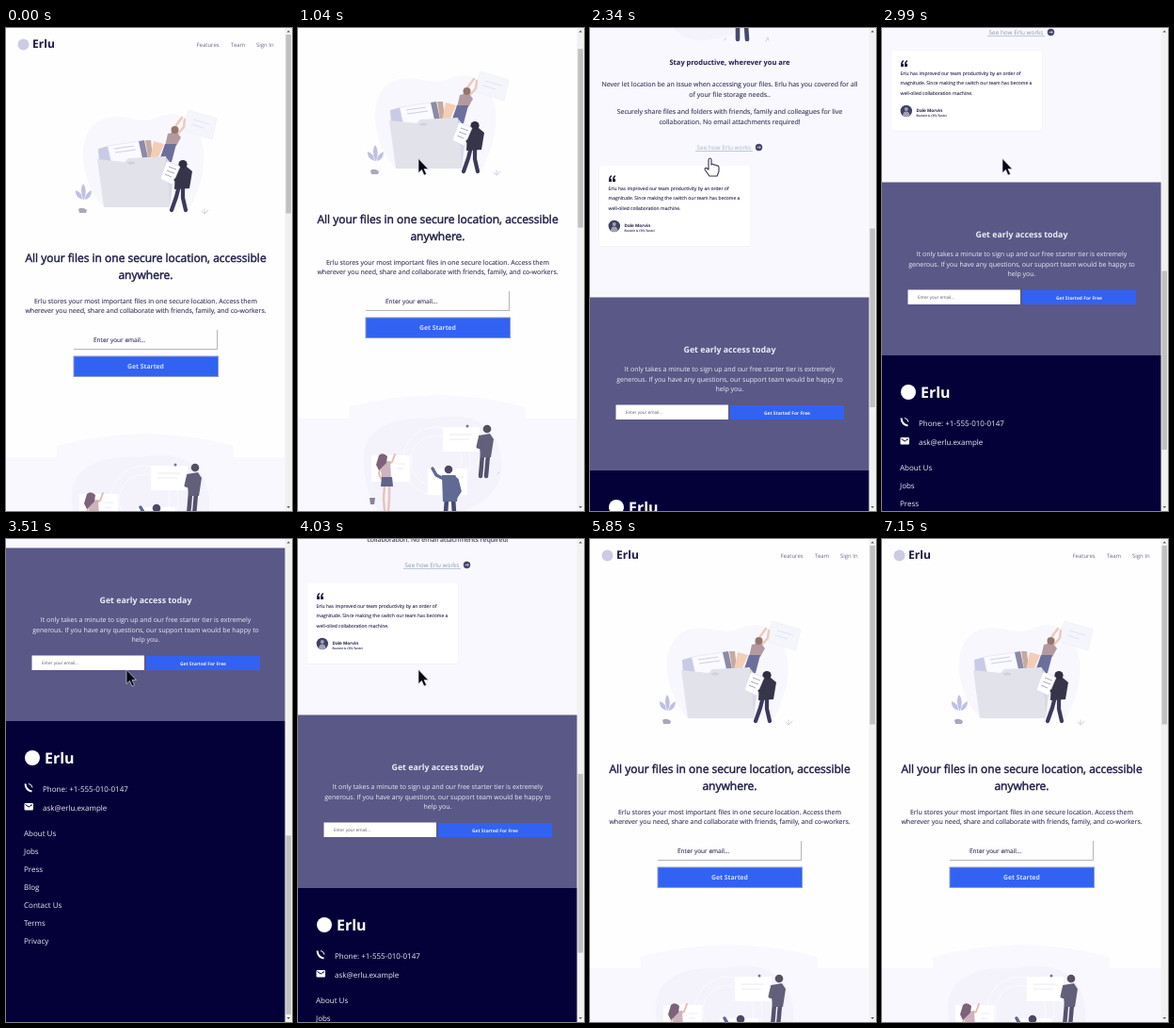
Recreate the animation shown at these times as an HTML page. Size 304 px wide and 512 px high, loop 7.28 s.

```html
<!DOCTYPE html>
<html lang="en">
<head>
<meta charset="utf-8">
<title>Landing page scroll</title>
<style>
  html, body { margin: 0; width: 100%; height: 100%; overflow: hidden; background: #fefefe; }
  svg { display: block; width: 100vw; height: 100vh; }
  text { font: 7px "Open Sans", sans-serif; fill: #37365a; stroke: #37365a; stroke-width: .12; text-rendering: geometricPrecision; white-space: pre; }
  .mid { text-anchor: middle; }
  .bold { font-weight: 700; stroke: none; }
  .ink { fill: #1f1d47; }
  .hero { font-size: 12px; fill: #1f1d47; stroke: #1f1d47; stroke-width: .45; }
  .nav { font-size: 6px; fill: #6c6a88; stroke: none; }
  .quote { font-size: 5px; fill: #29284a; }
  .light text, .foot text { fill: #ededf6; stroke: none; }
  .foot text { font-size: 8px; }
  .limb { fill: none; stroke-linecap: round; stroke-linejoin: round; }
  #link text { font-size: 6.4px; fill: #8b98aa; stroke: none; }
  #link path { stroke: #a3b5c4; stroke-width: .7; }
  #link.hover text { fill: #a6b5cc; }
</style>
</head>
<body>
<svg viewBox="0 0 304 512">
  <g id="page">
    <rect width="297" height="1345" fill="#fefefe"/>

    <!-- header -->
    <circle cx="18.5" cy="17.5" r="6" fill="#cccbe4"/>
    <text x="28" y="21.3" class="bold ink" style="font-size:12.1px">Erlu</text>
    <text x="202.5" y="19.8" class="nav">Features</text>
    <text x="239" y="19.8" class="nav">Team</text>
    <text x="266" y="19.8" class="nav">Sign In</text>

    <!-- hero picture -->
    <path fill="#f7f7fd" d="M84 151C78 128 84 100 108 95C130 91 142 103 160 95C186 83 205 101 209 124C214 147 205 172 196 190H104C96 181 87 167 84 151Z"/>
    <path fill="#f5f5fc" stroke="#ededf7" stroke-width=".6" d="M194 87L224 96L219 118L186 108Z"/>
    <path stroke="#e4e4f2" d="M199 97L216 102M197 102L210 106"/>
    <path fill="#c9cbe6" d="M98 128L109 125L112 143H99Z"/>
    <path fill="#fafaff" stroke="#e0e0ee" stroke-width=".6" d="M108 125L141 120L148 143H112Z"/>
    <path stroke="#cfcfe6" d="M115 128L136 125M116 132L138 129"/>
    <path fill="#8d8aa5" d="M141 120L147 119L151 138H145Z"/>
    <path fill="#c5aaa3" d="M148 119L154 119L156 137H151Z"/>
    <path fill="#f3cdb6" d="M157 120L168 123L161 139H153Z"/>
    <path class="limb" stroke="#eccab9" stroke-width="2.4" d="M176 112L181 103L187 95M182 113L189 105L190 97"/>
    <path fill="#b39aa0" d="M172 112L181 110L186 116L181 125H169Z"/>
    <circle cx="179.500" cy="108" r="4" fill="#94766f"/>
    <path fill="#6c6f9c" d="M169 123H181L176 142L162 143Z"/>
    <path fill="#e2e2eb" d="M97 139L126 142L130 138L170 136L174 190H104Z"/>
    <path fill="#d9d9e5" d="M170 137L179 148L174 190Z"/>
    <ellipse cx="133" cy="143" rx="4" ry="1.500" fill="#d0d0df"/>
    <path class="limb" stroke="#3b3a5a" stroke-width="4.200" d="M184 167L181 179L176 193M188 167L188 180L191 193"/>
    <path fill="#37354a" d="M180 149L192 147L198 152L195 170L179 171Z"/>
    <circle cx="188" cy="144.500" r="4.600" fill="#312e40"/>
    <path fill="#fff" stroke="#d8d8e6" stroke-width=".6" d="M171 141L185 147L177 166L164 160Z"/>
    <path stroke="#a9a8bd" d="M173 147L181 150M171 151L179 154M169 155L176 158"/>
    <path class="limb" stroke="#37354a" stroke-width="3" d="M194 156L187 163L180 161"/>
    <path fill="#bfc0e2" d="M82 182Q78 170 82 165Q87 171 83 182ZM81 182Q73 179 74 172Q81 174 81 182ZM84 182Q84 175 91 172Q91 180 84 182Z"/>
    <path class="limb" stroke="#cfcfe6" d="M211 197V192M208 194L211 197L215 193"/>
    <path fill="#a9a8bd" d="M77 192Q81 189 86 193L85 196H78Z"/>

    <!-- hero copy -->
    <text x="148.500" y="248.300" class="mid hero">All your files in one secure location, accessible</text>
    <text x="148.500" y="266.300" class="mid hero">anywhere.</text>
    <text x="148.500" y="291.700" class="mid">Erlu stores your most important files in one secure location. Access them</text>
    <text x="148.500" y="301.700" class="mid">wherever you need, share and collaborate with friends, family, and co-workers.</text>
    <path fill="none" stroke="#b4b4bd" d="M72 340.500H224.500V320"/>
    <text x="93" y="333.200" style="font-size:6.5px">Enter your email...</text>
    <rect x="72" y="348" width="153.500" height="21.500" fill="#3262f2" stroke="#8a9ad2"/>
    <text x="148.500" y="361.200" class="mid bold" style="font-size:6.8px;fill:#d3dcfd">Get Started</text>

    <!-- productivity section -->
    <path fill="#f8f8fe" d="M0 455H54V443Q98 431 148 430Q198 431 242 443V455H297V843H0Z"/>
    <path fill="#f4f3fc" d="M70 494C72 462 108 452 143 455C177 447 208 458 214 488C221 512 212 536 190 546C168 558 122 580 98 565C78 552 69 522 70 494Z"/>
    <g fill="none" stroke="#fbfbff">
      <circle cx="147" cy="500" r="36"/><circle cx="147" cy="500" r="27"/>
    </g>
    <g fill="#fff">
      <rect x="154" y="464" width="39" height="26"/>
      <rect x="78" y="494" width="41" height="28"/>
      <rect x="138" y="508" width="42" height="28"/>
    </g>
    <path stroke="#e8e8f5" d="M161 472H185M161 477H182M105 503H114M105 508H112M169 517H176"/>
    <circle cx="180" cy="463" r="1.500" fill="#777695"/>

    <path class="limb" stroke="#e8c5be" stroke-width="2.600" d="M92 526L91 540L92 552M97 526L97 540L96 552"/>
    <path class="limb" stroke="#e6bdb5" stroke-width="2" d="M96 503L100 501L103 493M88 504L86 514L90 521"/>
    <path fill="#cdb4be" d="M87 501L98 500L99 518H89Z"/>
    <path fill="#626389" d="M89 517H100L101 527H88Z"/>
    <path fill="#7c6379" d="M86 494Q90 490 95 495L94 502L86 510L83 504Z"/>
    <path fill="#85849c" d="M76 539H82L81 546H77Z"/>

    <path class="limb" stroke="#474a70" stroke-width="4.600" d="M158 540L157 555L157 569M165 540L166 555L167 569"/>
    <path fill="#606a94" d="M153 515L167 515L171 521L169 543H154Z"/>
    <path class="limb" stroke="#606a94" stroke-width="3.500" d="M155 519L147 515L143 508M169 520L172 532L168 538"/>
    <circle cx="160" cy="509" r="4.300" fill="#4c4863"/>

    <path class="limb" stroke="#55526d" stroke-width="4.500" d="M196 493L195 505L194 516M202 493L201 505L200 516"/>
    <path fill="#625f7a" d="M192 473L204 471L208 477L205 496H194Z"/>
    <path class="limb" stroke="#625f7a" stroke-width="3" d="M193 476L191 485L198 487"/>
    <circle cx="201" cy="466" r="4.300" fill="#57505f"/>
    <path class="limb" stroke="#cfcee0" d="M187 571L189 567L190 570M142 570L145 568M212 514L214 512"/>

    <text x="148.500" y="595.700" class="mid bold ink" style="font-size:7.5px">Stay productive, wherever you are</text>
    <text x="148.500" y="618.600" class="mid">Never let location be an issue when accessing your files. Erlu has you covered for all</text>
    <text x="148.500" y="629.600" class="mid">of your file storage needs..</text>
    <text x="148.500" y="648" class="mid">Securely share files and folders with friends, family and colleagues for live</text>
    <text x="148.500" y="658.700" class="mid">collaboration. No email attachments required!</text>
    <g id="link">
      <text x="142.500" y="685.800" class="mid">See how Erlu works</text>
      <path d="M112 687.500H173"/>
      <circle cx="179.500" cy="683.500" r="3.700" fill="#45456c"/>
      <path style="stroke:#d6dbea" fill="none" d="M177.500 683.500H181M179.800 682L181.300 683.500L179.800 685"/>
    </g>

    <!-- testimonial -->
    <rect x="9.500" y="703" width="161" height="86" rx="2" fill="#f1f1f8"/>
    <rect x="10" y="703" width="160" height="85" rx="2" fill="#fff"/>
    <path fill="#1e1b42" d="M23 713Q20 714 20 718V720H23V717H21.700Q22 715 23 714.500ZM27 713Q24 714 24 718V720H27V717H25.700Q26 715 27 714.500Z"/>
    <text x="19.500" y="728.700" class="quote">Erlu has improved our team productivity by an order of</text>
    <text x="19.500" y="739.400" class="quote">magnitude. Since making the switch our team has become a</text>
    <text x="19.500" y="750" class="quote">well-oiled collaboration machine.</text>
    <circle cx="25.800" cy="767" r="6.200" fill="#3f4262"/>
    <path fill="#a2a0b5" d="M22 771.800Q22.500 767.500 25.800 767.500T29.600 771.800Q25.800 774.500 22 771.800Z"/>
    <circle cx="25.800" cy="765" r="2" fill="#a2a0b5"/>
    <text x="36.500" y="767.700" class="bold ink" style="font-size:4.6px">Dale Morvin</text>
    <text x="36.500" y="772.700" style="font-size:3px">Founder &amp; CEO, Tandel</text>

    <!-- sign-up -->
    <g class="light">
      <rect y="842.500" width="297" height="184" fill="#5a5887"/>
      <text x="148.500" y="901.400" class="mid bold" style="font-size:8.8px">Get early access today</text>
      <text x="148.500" y="921" class="mid">It only takes a minute to sign up and our free starter tier is extremely</text>
      <text x="148.500" y="931.500" class="mid">generous. If you have any questions, our support team would be happy to</text>
      <text x="148.500" y="942" class="mid">help you.</text>
      <rect x="27.500" y="956.500" width="119.500" height="15.500" fill="#fff"/>
      <rect x="149" y="957" width="121" height="15" fill="#3262f2"/>
      <text x="38" y="966.300" style="font-size:4.6px;fill:#55556e">Enter your email...</text>
      <text x="209.500" y="966.500" class="mid bold" style="font-size:4.9px">Get Started For Free</text>
    </g>

    <!-- footer -->
    <g class="foot">
      <rect y="1026" width="297" height="319" fill="#040139"/>
      <circle cx="28" cy="1065" r="8" fill="#fff"/>
      <text x="41" y="1070.700" class="bold" style="font-size:16px;fill:#fff">Erlu</text>
      <path fill="none" stroke="#fff" stroke-width="2" d="M20.500 1092.500Q21 1099.500 27.500 1100.500"/>
      <path fill="none" stroke="#fff" d="M24 1092.500Q27.500 1093 28 1096.500"/>
      <rect x="19.500" y="1113" width="9.500" height="7.500" rx="1" fill="#fff"/>
      <path fill="none" stroke="#040139" d="M20.500 1114.500L24.250 1117L28 1114.500"/>
      <text x="39" y="1101.300">Phone: +1-555-010-0147</text>
      <text x="39" y="1121">ask@erlu.example</text>
      <text x="19" y="1148.300">About Us</text>
      <text x="19" y="1167.300">Jobs</text>
      <text x="19" y="1186.300">Press</text>
      <text x="19" y="1205.300">Blog</text>
      <text x="19" y="1224.300">Contact Us</text>
      <text x="19" y="1243.300">Terms</text>
      <text x="19" y="1262.300">Privacy</text>
    </g>
  </g>

  <!-- scrollbar -->
  <rect x="296.500" width="7.500" height="512" fill="#f1f1f1"/>
  <rect id="thumb" x="297.500" y="7" width="5.500" height="189.500" fill="#c1c1c1"/>
  <path fill="#555" d="M298.500 4.500H302L300.250 2.500ZM298.500 507H302L300.250 509Z"/>

  <!-- pointers -->
  <path id="arrow" fill="#080814" stroke="#e8e8f2" stroke-width=".6" d="M128 138.500V153.500L131.500 150.300L134 156L136.500 154.800L134 149.500H138.500Z"/>
  <path id="hand" fill="#fff" stroke="#34344a" stroke-width="1.100" stroke-linejoin="round" d="M126 150V140Q126 138 127.500 138T129 140V145Q130.500 143.500 132 145.300Q133.500 144.300 134.500 146Q137 145.500 137 148V152L135 157H127L122.300 150.500Q121.500 148.500 123.500 148.200Z"/>
</svg>
<script>
  const LOOP = 7280, STEP = 130, SCROLLBAR_RATIO = 0.369;
  // [time, scroll offset]
  const scrollKeys = [
    [0, 0], [780, 0], [1170, 62], [1690, 256], [2340, 557], [2470, 570], [2600, 570],
    [2990, 679], [3510, 833], [3640, 833], [4030, 656], [4940, 173], [5330, 0], [LOOP, 0]
  ];
  const byId = id => document.getElementById(id);
  const show = (id, on) => byId(id).setAttribute("visibility", on ? "visible" : "hidden");

  function scrollAt(t) {
    const i = scrollKeys.findIndex(key => key[0] > t);
    const [t0, y0] = scrollKeys[i - 1], [t1, y1] = scrollKeys[i];
    return y0 + (y1 - y0) * (t - t0) / (t1 - t0);
  }

  function draw(now) {
    const t = Math.floor((now % LOOP) / STEP) * STEP;
    const y = Math.round(scrollAt(t));
    const pointing = t >= 2340 && t < 2730;
    byId("page").setAttribute("transform", `translate(0 ${-y})`);
    byId("thumb").setAttribute("y", 7 + y * SCROLLBAR_RATIO);
    byId("link").classList.toggle("hover", pointing);
    show("hand", pointing);
    show("arrow", !pointing && t >= 780 && t < 5460);
  }

  const start = performance.now();
  function tick() {
    draw(performance.now() - start);
    requestAnimationFrame(tick);
  }
  tick();
</script>
</body>
</html>
```
